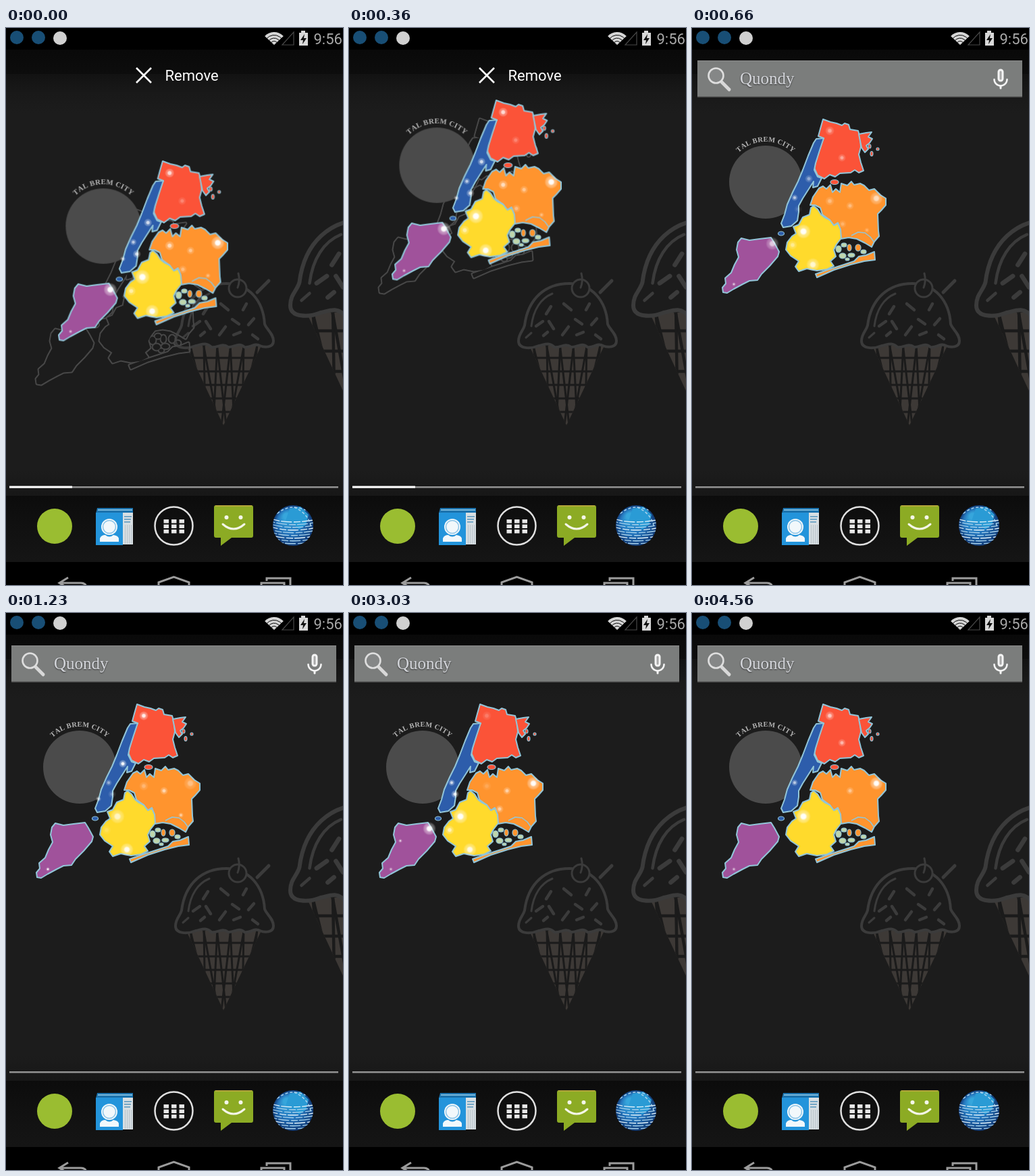
Animation of 499x824 px, one loop 4590 ms. Source, as an HTML page with a canvas:

```html
<!DOCTYPE html>
<html lang="en">
<head>
<meta charset="utf-8">
<title>Home screen widget</title>
<style>
html, body { margin: 0; width: 100%; height: 100%; overflow: hidden; background: #000; }
canvas { display: block; width: 499px; height: 824px; }
</style>
</head>
<body>
<canvas id="stage" width="499" height="824"></canvas>
<script>
const W = 499, H = 824, LOOP = 4590;
const ctx = document.getElementById('stage').getContext('2d');

const clamp = v => Math.max(0, Math.min(1, v));
const mix = (a, b, u) => a + (b - a) * u;
const ramp = (t, a, b) => clamp((t - a) / (b - a));
const ease = u => u * u * (3 - 2 * u);

function layer(draw) {
  const c = document.createElement('canvas');
  c.width = W; c.height = H;
  draw(c.getContext('2d'));
  return c;
}
function fill(g, path, color) { g.fillStyle = color; g.fill(new Path2D(path)); }
function stroke(g, path, color, width) {
  g.strokeStyle = color; g.lineWidth = width;
  g.stroke(new Path2D(path));
}
function disc(g, x, y, r, color) {
  g.fillStyle = color;
  g.beginPath(); g.arc(x, y, r, 0, 7); g.fill();
}
function ring(g, x, y, r, color, width, a = 0, b = Math.PI * 2) {
  g.strokeStyle = color; g.lineWidth = width;
  g.beginPath(); g.arc(x, y, r, a, b); g.stroke();
}
function box(g, x, y, w, h, color) { g.fillStyle = color; g.fillRect(x, y, w, h); }
function text(g, str, x, y, font, color) {
  g.font = font; g.fillStyle = color; g.fillText(str, x, y);
}
function shade(g, y0, y1, ...colors) {
  const s = g.createLinearGradient(0, y0, 0, y1);
  colors.forEach((c, i) => s.addColorStop(i / (colors.length - 1), c));
  box(g, 0, y0, W, y1 - y0, s);
}

// Wallpaper
function iceCream(g, x, y, scale) {
  const line = '#3b3b3b';
  g.save();
  g.translate(x, y); g.scale(scale, scale);
  g.lineCap = g.lineJoin = 'round';
  const cone = new Path2D('M18-2H129L73 116Z');
  g.fillStyle = '#3d3936'; g.fill(cone);
  g.save(); g.clip(cone);
  for (let i = 0; i < 6; i++) {
    const d = i * 20;
    stroke(g, `M${23 + d} -6L${53 + d * .6} 116`, '#1b1b1b', 3);
    stroke(g, `M${124 - d} -6L${94 - d * .6} 116`, '#1b1b1b', 3);
    stroke(g, `M10 ${16 + d}H140`, '#1b1b1b', 3);
  }
  g.restore();
  const scoop = 'M11-32C16-72 42-94 77-94C111-94 132-68 134-34C137-26 147-20 147-9C147 1 134 1 127-2' +
    'C119-7 112 2 104 0C96-8 88 1 80 0C71-7 63 2 55 0C47-8 39-3 32-2C20 3 2 3 2-9C2-20 9-24 11-32Z';
  fill(g, scoop, '#1c1c1c');
  stroke(g, scoop, line, 4);
  stroke(g, 'M21-31C24-55 35-72 52-79M13-14L21-21', line, 3);
  stroke(g, 'M43-49L50-60M69-64L80-55M102-55L107-64M28-31L38-38M47-38L54-27M67-18L76-30' +
    'M86-41L96-34M110-33L118-42M116-18L124-12M88-18L98-22M39-17L45-22', line, 4.5);
  disc(g, 94, -87, 13, '#1c1c1c');
  ring(g, 94, -87, 13, line, 3);
  stroke(g, 'M94-88Q98-98 95-109', line, 3);
  stroke(g, 'M123-81L140-98', line, 5);
  g.restore();
}

// Dock and system bars
function statusBar(g) {
  box(g, 0, 0, W, 32, '#000');
  disc(g, 16, 14, 10, '#184e75');
  disc(g, 48, 14, 10, '#184e75');
  disc(g, 80, 15, 10, '#d0d0d0');
  g.fillStyle = '#d6d6d6';
  g.beginPath(); g.moveTo(397, 25);
  g.arc(397, 25, 19, -Math.PI * .76, -Math.PI * .24); g.fill();
  [5.5, 10, 14.5].forEach(r => ring(g, 397, 25, r, '#000', 1, -2.5, -.6));
  stroke(g, 'M409 25H426V6Z', '#484848', 1.2);
  fill(g, 'M437 4H443V7H447V26H434V7H437Z', '#d8d8d8');
  fill(g, 'M442 9L436 18H440L439 24L445 15H441Z', '#111');
  text(g, '9:56', 455.5, 24, '22px Roboto, sans-serif', '#a8a8a8');
}
function contacts(g) {
  fill(g, 'M135 710H188V718H133Z', '#1b72ad');
  stroke(g, 'M136 713H187', '#77b7dc', 2);
  box(g, 172, 717, 16, 47, '#d8dfe3');
  box(g, 133, 717, 40, 48, '#2394db');
  for (let i = 0; i < 3; i++) box(g, 175, 722 + i * 4, 11 - i, 1.5, '#5796bd');
  for (let i = 0; i < 4; i++) box(g, 176 + i * 3, 735, 1, 28, '#b7c2c9');
  disc(g, 153, 738, 12, '#f2f8fb');
  ring(g, 153, 738, 9.5, '#8cc4e7', 1.5);
  fill(g, 'M139 760V755Q141 750 147 750Q153 755 159 750Q166 751 167 755V760Z', '#f2f8fb');
}
function globe(g) {
  const s = g.createRadialGradient(415, 722, 4, 425, 736, 30);
  s.addColorStop(0, '#36a6dc'); s.addColorStop(.55, '#2576bd'); s.addColorStop(1, '#123c78');
  g.save();
  g.beginPath(); g.arc(425, 736, 30, 0, 7); g.clip();
  box(g, 395, 706, 60, 60, s);
  fill(g, 'M420 711L436 708L448 720L444 735L434 742L424 732L414 729Z', '#2a9bd5');
  g.setLineDash([9, 3, 15, 4]);
  for (let i = 0; i < 9; i++) {
    const y = 727 + i * 4;
    g.lineDashOffset = i * 7;
    stroke(g, `M396 ${y}Q420 ${y + 7} 455 ${y + 1}`, i % 3 ? '#a7d2ec' : '#e0f1fa', 1.3);
  }
  g.setLineDash([3, 4]);
  stroke(g, 'M402 718Q420 703 443 713M427 709Q447 718 451 736', '#a7d2ec', 1.5);
  g.restore();
}
function dock(g) {
  disc(g, 72, 737, 26, '#9abd31');
  contacts(g);
  ring(g, 248.5, 736.5, 28, '#e0e0e0', 2.5);
  for (let i = 0; i < 9; i++)
    box(g, 233.5 + i % 3 * 11.5, 727 + Math.floor(i / 3) * 7.5, 7.5, 5.5, '#e8e8e8');
  fill(g, 'M311 706H363Q366 706 366 709V751Q366 754 363 754H334L318 766V754H311Q308 754 308 751V709Q308 706 311 706Z', '#8cab24');
  stroke(g, 'M310 707H364', '#c0a640', 1.5);
  disc(g, 326.5, 724, 3, '#f4f6e8');
  disc(g, 347.5, 724, 3, '#f4f6e8');
  g.lineCap = 'round';
  stroke(g, 'M321 734Q337 748 353 734', '#f4f6e8', 3);
  globe(g);
}
function navBar(g) {
  box(g, 0, 790, W, 34, '#000');
  g.lineCap = 'butt'; g.lineJoin = 'miter';
  const c = '#9c9c9c';
  stroke(g, 'M92 813L79 821L92 829M80 821H111Q119 821 119 829', c, 3);
  stroke(g, 'M226 829V820L248.5 812L271 820V829', c, 3);
  stroke(g, 'M386 818V814H421V829M378 829V821H412V829', c, 3);
}

const backdrop = layer(g => {
  box(g, 0, 0, W, H, '#1c1c1c');
  shade(g, 32, 68, '#090909', '#0d0d0d');
  shade(g, 68, 125, '#121212', '#191919', '#1c1c1c');
  shade(g, 655, 692, '#1c1c1c', '#171717');
  shade(g, 692, 790, '#0c0c0c', '#111', '#151515');
  iceCream(g, 249, 472, 1);
  iceCream(g, 418, 424, 1.5);
  statusBar(g);
  box(g, 5, 678, 487, 2.5, '#929292');
  dock(g);
  navBar(g);
});

const searchBar = layer(g => {
  box(g, 8, 48, 481, 54, '#7b7d7c');
  box(g, 8, 48, 481, 1, '#8b8b8b');
  box(g, 8, 101, 481, 1.5, '#5c5c5c');
  g.lineCap = 'round';
  stroke(g, 'M44 80L55 91', '#d8d8d8', 5);
  disc(g, 35.5, 70.5, 11, '#858787');
  ring(g, 35.5, 70.5, 11, '#dedede', 2.6);
  g.shadowColor = '#333'; g.shadowBlur = 2; g.shadowOffsetY = 1;
  text(g, 'Quondy', 71, 83, '25px "Liberation Serif", serif', '#d5d7dc');
  g.shadowColor = 'transparent';
  ring(g, 457, 76, 9.5, '#f4f4f4', 2.5, 0, Math.PI);
  stroke(g, 'M457 65V75', '#f4f4f4', 9);
  stroke(g, 'M457 65V75', '#a8a8a8', 3);
  stroke(g, 'M457 86V89', '#f4f4f4', 3);
});

const dragBar = layer(g => {
  stroke(g, 'M193 59L215 81M215 59L193 81', '#fff', 2.6);
  text(g, 'Remove', 235.5, 78, '22px Roboto, sans-serif', '#fff');
  box(g, 5, 677.5, 93, 3, '#fff');
});

// Map widget
const RED = '#fb5338', BLUE = '#2d5dab', ORANGE = '#ff942e', YELLOW = '#ffda2c',
      PURPLE = '#a0529b', PALE = '#bfd6ad', EDGE = '#92c5d8';
const dot = (x, y, rx, ry) => `M${x - rx} ${y}a${rx} ${ry} 0 1 0 ${2 * rx} 0a${rx} ${ry} 0 1 0 ${-2 * rx} 0Z`;
const regions = [
  [RED, 'M194 135L205 139L214 141L222 144L226 141L232 143L234 150L246 152L249 162L250 176L247 187L250 199L254 211L247 214L241 210L235 214L219 215L212 220L204 217L196 223L186 218L181 207L184 195L188 178L195 163L187 160L190 149Z'],
  [RED, 'M247 157L258 155L266 154L261 161L267 164L263 170L258 174L261 179L256 184L251 177Z'],
  [BLUE, 'M184 164L195 163L189 181L183 200L181 210L186 220L192 222L186 234L179 236L180 227L173 238L164 252L158 263L158 272L156 285L147 293L135 295L132 289L137 276L141 261L149 243L157 227L164 210L172 189L180 170Z'],
  [ORANGE, 'M175 262L179 250L188 237L194 234L199 238L205 232L208 243L213 238L219 243L221 230L230 233L236 227L240 232L249 230L255 233L262 240L270 238L279 247L287 252L287 262L280 270L275 275L276 300L277 308L270 316L266 324L256 318L244 312L232 310L220 312L219 298L216 288L210 292L204 284L193 276L190 266L182 262Z'],
  [ORANGE, 'M183 364L200 358L225 350L240 345L247 338L258 336L270 331L271 343L255 345L235 350L210 358L185 369Z'],
  [YELLOW, 'M180 263L186 268L191 276L196 280L204 284L210 292L216 289L220 298L221 311L214 320L210 328L213 338L205 345L210 352L200 357L185 359L170 356L158 360L153 353L158 345L146 337L139 328L141 317L148 308L154 304L150 294L158 291L164 280L174 276L176 266Z'],
  [PURPLE, 'M68 317L73 311L85 314L100 312L117 310L122 318L129 331L127 338L115 352L103 364L97 373L85 374L75 379L62 386L52 392L46 391L45 384L50 378L49 370L58 362L63 350L69 339L66 328Z'],
  [BLUE, dot(132, 304, 4.5, 3)], [RED, dot(211, 228, 6, 3.5)],
  [RED, dot(263, 175, 2, 3)], [RED, dot(266, 186, 2, 3.5)], [RED, dot(275, 179, 2, 2)],
  [PALE, dot(217, 327, 4, 5)], [PALE, dot(225, 321, 4, 3)], [ORANGE, dot(233, 325, 3, 5)],
  [PALE, dot(223, 337, 5, 4)], [PALE, dot(236, 336, 5, 3)], [ORANGE, dot(246, 325, 4, 5)],
  [PALE, dot(254, 331, 4, 3)], [PALE, dot(230, 342, 3, 2)]
];

function arcText(g, str, x, y, r) {
  g.font = 'bold 10.5px "Liberation Serif", serif';
  g.fillStyle = '#b4b4b4'; g.textAlign = 'center';
  const widths = [...str].map(c => g.measureText(c).width + .3);
  let a = -widths.reduce((p, q) => p + q) / 2 / r;
  widths.forEach((w, i) => {
    a += w / 2 / r;
    g.save(); g.translate(x, y); g.rotate(a);
    g.fillText(str[i], 0, -r);
    g.restore();
    a += w / 2 / r;
  });
}

const widget = layer(g => {
  disc(g, 109, 228, 54, '#4b4b4b');
  arcText(g, 'TAL BREM CITY', 109, 225, 57);
  g.lineJoin = 'round';
  for (const [color, path] of regions) {
    fill(g, path, color);
    stroke(g, path, EDGE, path.length > 60 ? 2 : 1.2);
  }
  stroke(g, 'M236 307L246 302L256 303L264 309L269 316', EDGE, 1.5);
});

const outline = layer(g => {
  g.lineJoin = 'round';
  for (const [, path] of regions) stroke(g, path, '#474747', 5);
  g.globalCompositeOperation = 'destination-out';
  for (const [, path] of regions) { fill(g, path, '#000'); stroke(g, path, '#000', 1); }
});

// Glow: x, y, radius, then brightness at each mark
const marks = [400, 660, 1860, 3030, 4560];
const glows = [
  [204, 152, 7, .8, .5, .8, .25, .7],
  [222, 192, 6, .3, .5, 0, 0, .6],
  [173, 223, 6, .8, .5, .7, 0, 0],
  [152, 251, 5, .7, .7, .6, .8, .7],
  [157, 268, 6, .8, .2, .9, .9, 0],
  [137, 275, 4, .7, 0, .6, 0, 0],
  [273, 252, 10, 1, .7, 1, 1, 1],
  [234, 263, 6, .5, .4, .5, .6, .5],
  [204, 256, 7, .7, .4, 0, .2, 0],
  [223, 290, 6, .4, .3, 0, .6, 0],
  [259, 299, 4, .4, .3, 0, 0, 0],
  [165, 301, 11, 1, 1, 1, 1, 1],
  [149, 321, 7, .6, .5, 0, .7, 0],
  [179, 350, 10, 1, .8, .4, .9, 0],
  [119, 319, 10, 1, .7, 0, 1, 0],
  [62, 379, 3, .6, .7, .6, .6, .6],
  [76, 337, 3, 0, 0, 0, .7, 0]
];
const halo = layer(g => {
  const s = g.createRadialGradient(20, 20, 0, 20, 20, 20);
  s.addColorStop(0, '#fff'); s.addColorStop(.3, 'rgba(255,255,255,.95)');
  s.addColorStop(.5, 'rgba(255,255,255,.42)'); s.addColorStop(.75, 'rgba(255,255,255,.28)');
  s.addColorStop(1, 'rgba(255,255,255,0)');
  disc(g, 20, 20, 20, s);
});

function twinkle(t) {
  for (const [a, b] of [[990, 1110], [2850, 3030], [3270, 3480], [3720, 3870]])
    if (t > a && t < b) t = a;
  let k = 0;
  while (k < 3 && t >= marks[k + 1]) k++;
  const u = ramp(t, marks[k], marks[k + 1]);
  glows.forEach(([x, y, r, ...level], i) => {
    const wave = .45 * Math.sin(Math.PI * u) * Math.sin(t / 140 + i * 2.4);
    ctx.globalAlpha = clamp(mix(level[k], level[k + 1], u) + wave);
    ctx.drawImage(halo, 0, 0, 40, 40, x - r, y - r, 2 * r, 2 * r);
  });
  ctx.globalAlpha = 1;
}

// Drag path: time, x, y
const drag = [[30, 31.5, 57.5], [150, 17.5, -8], [360, 17.5, -32.5], [540, 14, -46], [655, 0, 0]];
function place(t) {
  let i = 0;
  while (i < drag.length - 2 && t >= drag[i + 1][0]) i++;
  const [a, x0, y0] = drag[i], [b, x1, y1] = drag[i + 1];
  const u = ease(ramp(t, a, b));
  return [mix(x0, x1, u), mix(y0, y1, u)];
}
function paint(image, alpha, y = 0) {
  if (alpha <= 0) return;
  ctx.globalAlpha = alpha;
  ctx.drawImage(image, 0, y);
  ctx.globalAlpha = 1;
}

function render(t) {
  const dropped = ramp(t, 555, 655), moved = ramp(t, 40, 140);
  paint(backdrop, 1);
  paint(searchBar, dropped);
  paint(dragBar, 1 - dropped);
  paint(outline, 1 - moved, 135);
  paint(outline, moved * (1 - dropped));
  const [x, y] = place(t), scale = mix(1.033, 1, ease(dropped));
  ctx.save();
  ctx.translate(x, y);
  ctx.scale(scale, scale);
  paint(widget, 1);
  twinkle(t);
  ctx.restore();
}

const start = performance.now();
function tick() {
  render((performance.now() - start) % LOOP);
  requestAnimationFrame(tick);
}
tick();
</script>
</body>
</html>
```
